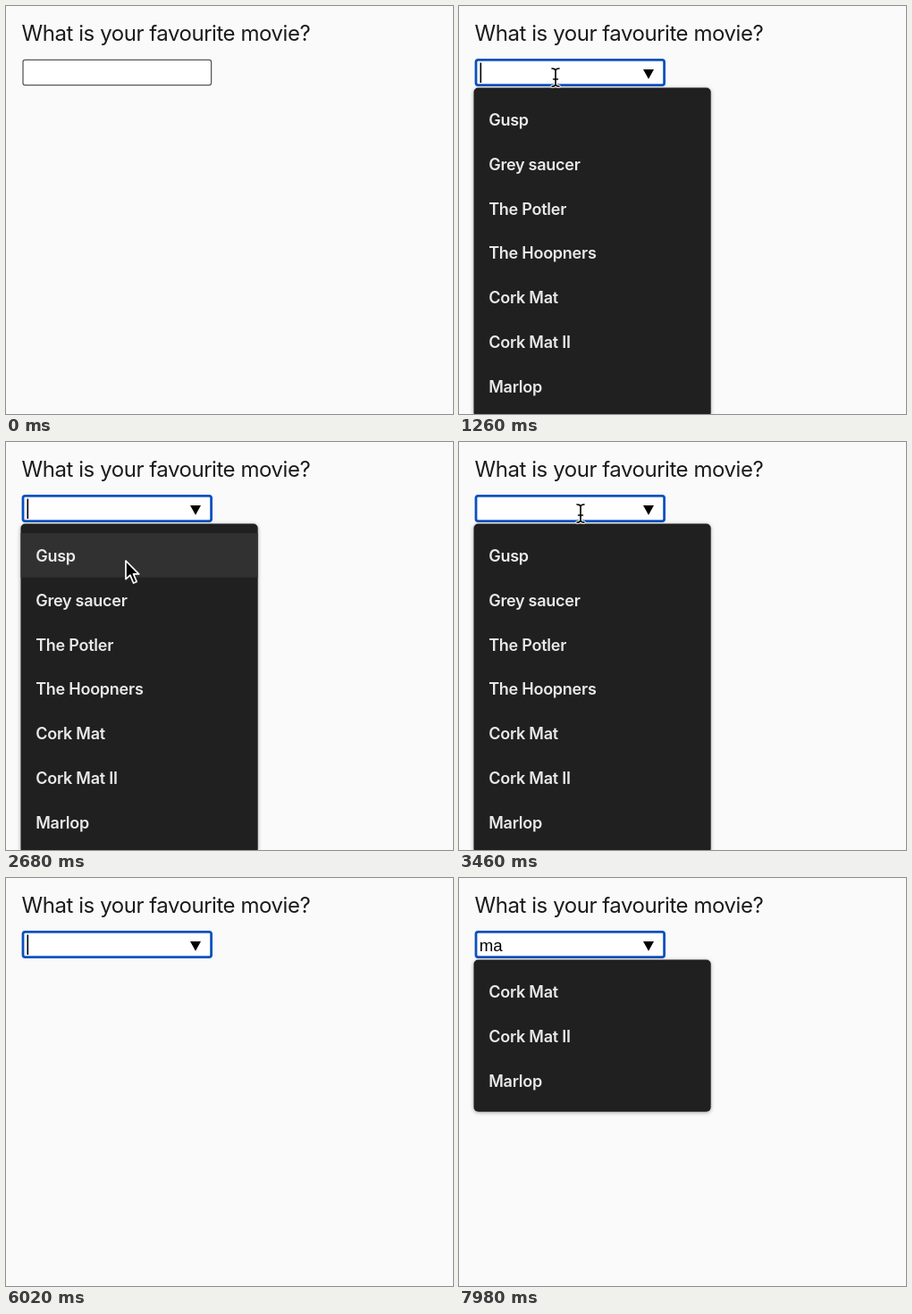
Recreate the animation shown at these times as an HTML page. Size 500 by 457 pixels, loop 8 s.

```html
<!DOCTYPE html>
<html lang="en">
<head>
<meta charset="utf-8">
<title>Datalist demo</title>
<style>
  html, body { margin: 0; width: 100%; height: 100%; overflow: hidden; background: #fafafa; }
  svg { display: block; width: 500px; height: 457px; }
  .heading { font: 400 24px Inter, sans-serif; letter-spacing: -.45px; fill: #1b1b1b; }
  .item { font: 600 18px Inter, sans-serif; letter-spacing: -.25px; fill: #e9e9e9; }
  .typed { font: 18.67px "Liberation Sans", Arial, sans-serif; }
  #field { fill: #fff; stroke: #555; stroke-width: 1.25px; }
  #field.focused { stroke: #0b51bd; stroke-width: 2.8px; }
  #popup { filter: drop-shadow(0 1px 2px rgba(0, 0, 0, .36)); }
</style>
</head>
<body>
<svg viewBox="0 0 500 457" xmlns="http://www.w3.org/2000/svg">
  <text class="heading" x="17.6" y="38.5">What is your favourite movie?</text>
  <rect id="field" x="19" y="60.4" width="210.6" height="28.2" rx="2.4"/>
  <path id="marker" d="M206 71H218L212 81.8Z"/>
  <text id="typed" class="typed" x="22.7" y="81.6"></text>
  <rect id="caret" y="63.5" width="1.6" height="22.5"/>
  <g id="popup">
    <rect id="panel" x="16.5" y="91.5" width="265.2" rx="5" fill="#202020"/>
    <rect id="glow" x="16.5" width="265.2" height="49.75" fill="#313131"/>
    <g id="items"></g>
  </g>
  <path id="arrow" d="M0 0V20.6L4.9 16.1L8.6 25L12.2 23.5L8.5 14.9H14.6Z"
    stroke="#fff" stroke-width="1.7" stroke-linejoin="round"/>
  <g id="beam" fill="none" stroke-linecap="round">
    <path id="beamShape" d="M-4-10Q0-10 0-7Q0-10 4-10M0-7V7M-4 10Q0 10 0 7Q0 10 4 10M-2.4 2H2.4"
      stroke="#fff" stroke-width="3.4"/>
    <use href="#beamShape" style="display:none"/>
  </g>
</svg>
<script>
const LOOP = 8000, ROW = 49.75, FIRST_ROW = 102;
const FOCUS = 1220, OPEN = 1240, BLINK = 580, CARET_DELAY = 300;
const titles = ["Gusp", "Grey saucer", "The Potler", "The Hoopners", "Cork Mat", "Cork Mat II", "Marlop"];

// each move eases the pointer to a point and rests there
const moves = [
  { at: 280, lasts: 420, x: 99, y: 61 },
  { at: 900, lasts: 120, x: 108, y: 80 },
  { at: 1640, lasts: 280, x: 119, y: 174 },
  { at: 2240, lasts: 220, x: 130, y: 300 },
  { at: 2460, lasts: 220, x: 134, y: 133 },
  { at: 2680, lasts: 340, x: 134, y: 65 },
  { at: 3080, lasts: 60, x: 130, y: 80 },
  { at: 3440, lasts: 20, x: 136, y: 80 }
];
// evenly spaced keystrokes; "<" is backspace
const bursts = [
  { at: 3620, every: 400, keys: "gu" },
  { at: 4900, every: 320, keys: "<<" },
  { at: 6480, every: 260, keys: "man" },
  { at: 7960, every: 0, keys: "<" }
];
const strokes = bursts.flatMap(b => [...b.keys].map((key, i) => ({ key, at: b.at + i * b.every })));

const $ = id => document.getElementById(id);
const show = (el, on) => { el.style.display = on ? "" : "none"; };

function add(parent, tag, attrs) {
  const el = document.createElementNS("http://www.w3.org/2000/svg", tag);
  for (const k in attrs) el.setAttribute(k, attrs[k]);
  parent.append(el);
  return el;
}

add($("beam"), "path", { d: $("beamShape").getAttribute("d"), stroke: "#000", "stroke-width": 1.6 });
const labels = titles.map((_, i) => add($("items"), "text", { class: "item", x: 33.2, y: 134.1 + i * ROW }));

// the pointer enters from the right and hides once typing starts
function pointerAt(t) {
  if (t < moves[0].at || t >= strokes[0].at) return null;
  let x = 504, y = 87;
  for (const m of moves) {
    const u = Math.min(1, Math.max(0, (t - m.at) / m.lasts));
    const e = u * u * (3 - 2 * u);
    x += (m.x - x) * e;
    y += (m.y - y) * e;
  }
  return { x, y };
}

function draw(t) {
  const focused = t >= FOCUS;
  const p = pointerAt(t);
  const overField = p && p.x > 18 && p.x < 231 && p.y > 59 && p.y < 91;
  $("field").classList.toggle("focused", focused);
  show($("marker"), focused || overField);

  const done = strokes.filter(s => s.at <= t);
  const value = done.reduce((text, { key }) => key === "<" ? text.slice(0, -1) : text + key, "");
  $("typed").textContent = value;

  // the caret restarts its blink shortly after each keystroke
  const blinkStart = done.length ? done[done.length - 1].at + CARET_DELAY : FOCUS;
  show($("caret"), t >= blinkStart && Math.floor((t - blinkStart) / BLINK) % 2 === 0);
  $("caret").setAttribute("x", 23.5 + (value ? $("typed").getComputedTextLength() : 0));

  const open = t >= OPEN && (value || !done.length);
  const list = open ? titles.filter(s => s.toLowerCase().includes(value)) : [];
  show($("popup"), open);
  $("panel").setAttribute("height", list.length * ROW + 21);
  labels.forEach((el, i) => { el.textContent = list[i] || ""; });

  const row = p ? Math.floor((p.y - FIRST_ROW) / ROW) : -1;
  show($("glow"), row >= 0 && row < list.length);
  $("glow").setAttribute("y", FIRST_ROW + row * ROW);

  show($("arrow"), p && !overField);
  show($("beam"), overField);
  if (p) for (const id of ["arrow", "beam"]) $(id).setAttribute("transform", `translate(${p.x} ${p.y})`);
}

const start = performance.now();
function tick(now) {
  draw(Math.max(0, now - start) % LOOP);
  requestAnimationFrame(tick);
}
draw(0);
requestAnimationFrame(tick);
</script>
</body>
</html>
```
